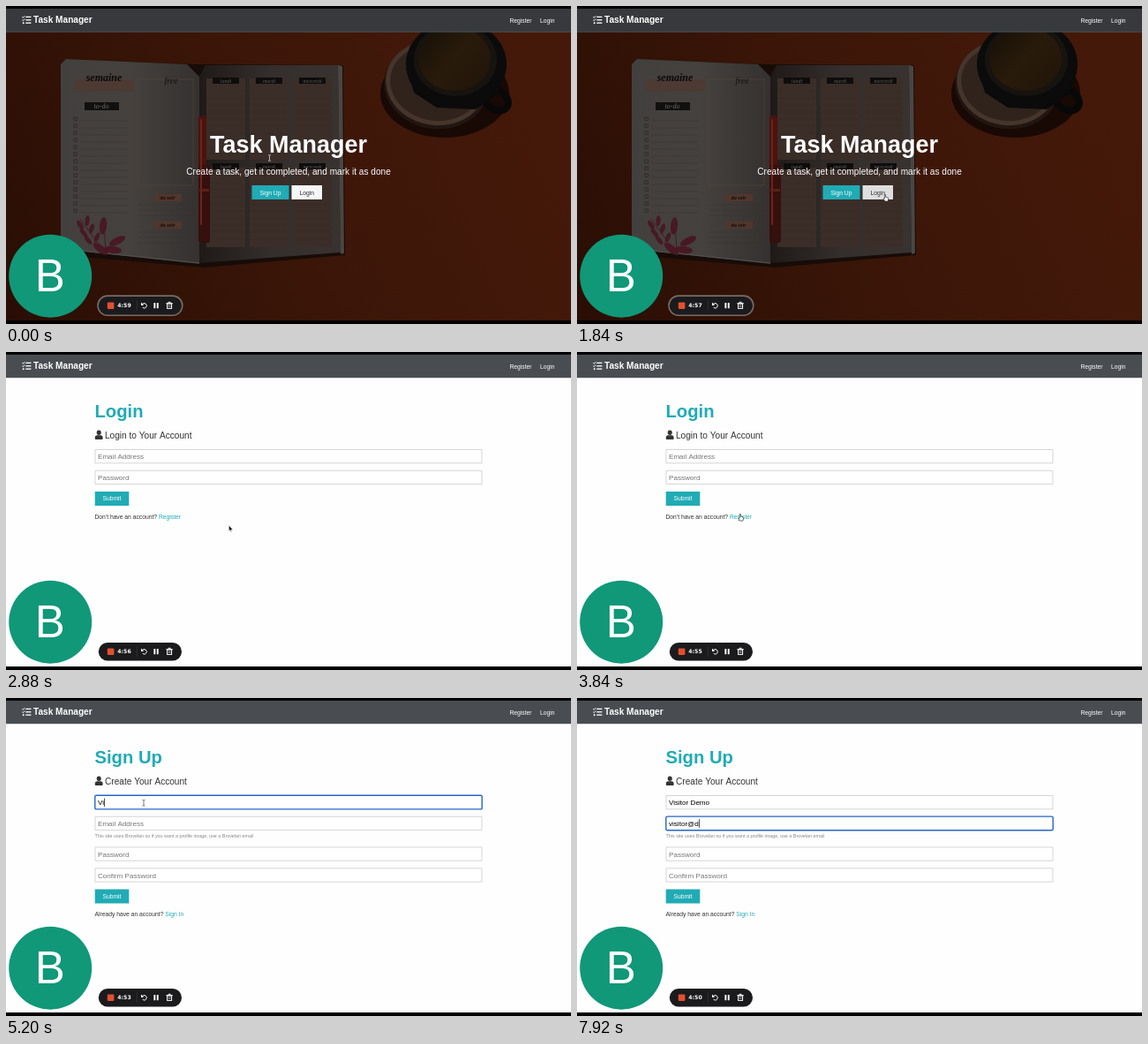
Animation of 640x360 px, one loop 8000 ms. Source, as an HTML page with a canvas:

```html
<!DOCTYPE html>
<html lang="en">
<head>
<meta charset="utf-8">
<title>Task Manager</title>
<style>
html, body { margin: 0; width: 100%; height: 100%; overflow: hidden; background: #000; }
canvas { display: block; width: 640px; height: 360px; }
</style>
</head>
<body>
<canvas id="stage" width="640" height="360"></canvas>
<script>
const c = document.getElementById('stage').getContext('2d');
const LOOP = 8000, STEP = 80;
const TEAL = '#20abb5', SANS = '"Liberation Sans", Arial, sans-serif';
const REM = 6.746;

// screen changes
const LOGIN_AT = 1920, SIGNUP_AT = 3920, NAME_FOCUS = 4480, EMAIL_FOCUS = 6560;
const TICKS = [560, 1440, 2480, 3360, 4240, 4960, 5760, 6560, 7360];

const NAME = 'Visitor Demo', EMAIL = 'visitor@d';
const NAME_KEYS = [4960, 5200, 5440, 5600, 5680, 5760, 5840, 5840, 6160, 6240, 6400, 6400];
const EMAIL_KEYS = [6960, 7040, 7120, 7280, 7360, 7440, 7600, 7760, 7920];

const count = (times, t) => times.filter(k => k <= t).length;

function rect(x, y, w, h, fill, r = 0) {
  c.beginPath();
  c.roundRect(x, y, w, h, r);
  c.fillStyle = fill;
  c.fill();
}

function oval(x, y, rx, ry, fill, turn = 0) {
  c.beginPath();
  c.ellipse(x, y, rx, ry, turn, 0, Math.PI * 2);
  c.fillStyle = fill;
  c.fill();
}

function poly(points, fill) {
  c.beginPath();
  points.forEach(([x, y]) => c.lineTo(x, y));
  c.closePath();
  c.fillStyle = fill;
  c.fill();
}

function line(x1, y1, x2, y2, color, width = 0.5) {
  c.beginPath();
  c.moveTo(x1, y1);
  c.lineTo(x2, y2);
  c.strokeStyle = color;
  c.lineWidth = width;
  c.stroke();
}

function text(s, x, y, size, color, weight = '', align = 'left', family = SANS) {
  c.font = `${weight} ${size}px ${family}`;
  c.fillStyle = color;
  c.textAlign = align;
  c.fillText(s, x, y);
  return c.measureText(s).width;
}

function fade(x1, y1, x2, y2, ...colors) {
  const g = c.createLinearGradient(x1, y1, x2, y2);
  colors.forEach((k, i) => g.addColorStop(i / (colors.length - 1), k));
  return g;
}

function notebook() {
  poly([[68, 60], [212, 66], [382, 67], [384, 282], [224, 296], [62, 282]], '#170c08');
  poly([[62, 66], [68, 60], [205, 66], [219, 80], [219, 292], [62, 275]],
    fade(62, 0, 219, 0, '#42403e', '#45413e', '#353130'));
  poly([[219, 80], [226, 67], [376, 67], [379, 279], [219, 291]],
    fade(219, 0, 380, 0, '#1f1a18', '#342e2c', '#383331'));
  poly([[376, 67], [381, 68], [383, 280], [379, 281]], '#4b4643');
  line(64, 275, 219, 291, '#57524e', 1);

  rect(78, 83, 67, 14, '#4c3a33');
  text('semaine', 111, 85, 12, '#0c0a0a', 'italic bold', 'center', '"Liberation Serif", serif');
  rect(89, 109, 39, 9, '#111010');
  text('to-do', 108, 116, 8, '#6c6865', 'italic', 'center', '"Liberation Serif", serif');
  for (let y = 126; y < 234; y += 8) {
    c.strokeStyle = '#23201f';
    c.lineWidth = 0.6;
    c.strokeRect(77, y, 3.5, 3.5);
    line(84, y + 4, 138, y + 4, '#38332f');
  }
  c.strokeStyle = '#5a4a38';
  c.strokeRect(149, 83, 63, 120);
  text('free', 187, 88, 10, '#14100e', 'italic', 'center', '"Liberation Serif", serif');
  for (const y of [213, 244]) {
    rect(168, y, 31, 8, '#51362c');
    text('du soir', 183, y + 6, 6, '#160d0a', 'italic bold', 'center', '"Liberation Serif", serif');
    for (let k = 12; k < 28; k += 6) line(150, y + k, 212, y + k, '#37322f');
  }

  for (let col = 0; col < 3; col++) {
    const x = 227 + col * 49, w = 44;
    rect(x, 82, w, 92, '#3b2d28');
    rect(x, 183, w, 90, '#3b2d28');
    for (let y = 96; y < 270; y += 8) if (y < 172 || y > 190) line(x + 2, y, x + w - 2, y, '#352824');
    for (const y of [81, 178]) {
      rect(x + 7, y, 30, 7, '#0f0d0c');
      text(['lundi', 'mardi', 'mercredi'][col], x + 22, y + 5.5, 6, '#5d5855', 'italic', 'center', '"Liberation Serif", serif');
    }
  }

  rect(218, 124, 9, 70, '#4b130e', 4);
  rect(218, 180, 13, 88, '#35100c', 3);
  rect(220, 128, 2, 120, '#6b241c', 1);
  rect(219, 207, 11, 3, '#5d2018');

  // pressed leaves
  const leaf = '#481924';
  [[84, 248, -0.6], [92, 243, 0.1], [88, 257, -0.7], [97, 252, 0.3], [93, 265, -0.7], [103, 262, 0.4]]
    .forEach(([x, y, a]) => oval(x, y, 2.5, 6, leaf, a));
  [[110, 249, 0.1], [126, 266, 1.1], [121, 276, 1.7], [107, 275, -0.9]]
    .forEach(([x, y, a]) => oval(x, y, 4, 10, leaf, a));
  line(84, 241, 114, 282, leaf, 1);
  line(111, 243, 113, 281, leaf, 1);
}

function coffee() {
  oval(497, 99, 73, 50, '#180905');
  oval(487, 90, 59, 49, '#211610', 0.15);
  oval(487, 87, 57, 48, '#45352b', 0.15);
  oval(487, 87, 52, 43, '#30231c', 0.15);
  c.beginPath();
  c.ellipse(555, 106, 15, 11, 0.6, 0, Math.PI * 2);
  c.strokeStyle = '#090808';
  c.lineWidth = 8;
  c.stroke();
  poly([[453, 64], [567, 64], [557, 100], [532, 117], [488, 115], [462, 98]], '#0b0a0a');
  oval(510, 66, 57, 50, '#0c0b0b');
  oval(509, 61, 47, 41, '#17130f');
  oval(508, 60, 41, 36, fade(470, 30, 540, 95, '#171008', '#291b0b', '#21150a'));
}

function home(t) {
  rect(0, 3, 640, 353, fade(0, 330, 600, 60, '#2a0e05', '#3b1608', '#45190a'));
  notebook();
  coffee();
  nav('#37393c');
  line(0, 29.3, 640, 29.3, '#52605f', 0.7);
  text('Task Manager', 320, 166, REM * 4, '#fff', 'bold', 'center');
  text('Create a task, get it completed, and mark it as done', 320, 191, REM * 1.5, '#fff', '', 'center');
  rect(278.5, 203, 42, 16, TEAL);
  text('Sign Up', 299.5, 213.5, REM, '#fff', '', 'center');
  rect(323.5, 203, 34.5, 16, t >= 1440 ? '#dedede' : '#f6f6f6');
  text('Login', 340.8, 213.5, REM, '#333', '', 'center');
}

function nav(fill) {
  rect(0, 3, 640, 26.3, fill);
  for (let i = 0; i < 3; i++) {
    const y = 12.4 + i * 3.4;
    line(22.3, y, 28.4, y, '#fff', 1.3);
    if (i < 2) {
      c.beginPath();
      c.moveTo(18.3, y);
      c.lineTo(19.4, y + 0.9);
      c.lineTo(21.2, y - 1.2);
      c.strokeStyle = '#fff';
      c.lineWidth = 1;
      c.stroke();
    } else oval(19.7, y, 1, 1, '#fff');
  }
  text('Task Manager', 31, 19.4, REM * 1.5, '#fff', 'bold');
  text('Register', 570.5, 18.6, REM, '#fff');
  text('Login', 605, 18.6, REM, '#fff');
}

function field(y, hint, value = '', focus = false) {
  c.beginPath();
  if (focus) {
    c.roundRect(100.8, y - 0.2, 438.4, 15.6, 1.5);
    c.strokeStyle = '#2467c8';
    c.lineWidth = 1.4;
  } else {
    c.rect(101, y, 438, 15.3);
    c.strokeStyle = '#c4c4c4';
    c.lineWidth = 0.7;
  }
  c.fillStyle = '#fff';
  c.fill();
  c.stroke();
  const w = text(value || hint, 104, y + 10.7, REM * 1.2, value ? '#000' : '#757575');
  if (focus) rect(104 + (value ? w + 0.2 : 0), y + 3, 0.7, 9.4, '#000');
}

function page(title, lead) {
  rect(0, 3, 640, 353, '#fefefe');
  nav('#494d51');
  text(title, 100.5, 73.8, REM * 3, TEAL, 'bold');
  oval(105.2, 91.2, 2.5, 2.7, '#333');
  rect(100.8, 94.2, 8.8, 4.8, '#333', [2.6, 2.6, 0.8, 0.8]);
  text(lead, 112, 97.5, REM * 1.5, '#333');
}

function submit(y, question, link) {
  rect(100.7, y, 38.6, 16, TEAL);
  text('Submit', 120, y + 10.4, REM, '#fff', '', 'center');
  const w = text(question + ' ', 100.5, y + 30.6, REM, '#333');
  text(link, 100.5 + w, y + 30.6, REM, TEAL);
}

function login() {
  page('Login', 'Login to Your Account');
  field(110.5, 'Email Address');
  field(134.3, 'Password');
  submit(158, "Don't have an account?", 'Register');
}

function signup(t) {
  page('Sign Up', 'Create Your Account');
  field(110.5, 'Name', NAME.slice(0, count(NAME_KEYS, t)), t >= NAME_FOCUS && t < EMAIL_FOCUS);
  field(134.3, 'Email Address', EMAIL.slice(0, count(EMAIL_KEYS, t)), t >= EMAIL_FOCUS);
  text('This site uses Brovelan so if you want a profile image, use a Brovelan email',
    100.5, 158, REM * 0.8, '#888');
  field(168.9, 'Password');
  field(192.8, 'Confirm Password');
  submit(216.6, 'Already have an account?', 'Sign In');
}

function recorder(t) {
  const dark = t < LOGIN_AT;
  oval(50.2, 305.7, 47, 47, '#109878');
  text('B', 49.8, 323, 51, '#fff', '', 'center');

  if (dark) rect(103.2, 327.3, 97.4, 23.6, '#776c63', 11.8);
  rect(104.8, 329, 94.2, 20.4, '#1b1b1e', 10.2);
  rect(114.8, 335.4, 7.6, 7.6, '#e2502f', 1.2);
  const sec = 59 - count(TICKS, t);
  text('4:' + sec, 134, 341.2, 6.2, '#fff', 'bold', 'center', '"DejaVu Sans", sans-serif');
  line(148.3, 333, 148.3, 345, '#3f3f43', 0.6);

  c.strokeStyle = '#fff';
  c.lineWidth = 1;
  c.beginPath();
  c.arc(156.6, 339.3, 2.7, -2.6, 2.4);
  c.stroke();
  poly([[153, 335.6], [153, 339], [156.2, 338.6]], '#fff');
  rect(167.4, 336, 1.9, 6.2, '#fff', 0.5);
  rect(170.8, 336, 1.9, 6.2, '#fff', 0.5);
  line(181.4, 336.7, 188.8, 336.7, '#fff', 1);
  line(183.6, 335.3, 186.6, 335.3, '#fff', 1);
  c.strokeRect(182.6, 337, 5, 5.4);
  line(184.3, 338.4, 184.3, 341, '#fff', 0.6);
  line(186, 338.4, 186, 341, '#fff', 0.6);
}

const shapes = {
  hand: new Path2D('M-1.6-4Q-.9-4.6-.4-4V-1.2L2-.7Q2.8-.4 2.7.4L2.2 3.6H-1.2L-3 .6Q-2.9-.2-1.6.6Z'),
  arrow: new Path2D('M-2-4V3L-.4 1.6 .7 4 1.7 3.5 .7 1.2H3Z'),
  beam: new Path2D('M-1.5-3.4Q0-3.4 0-2.7Q0-3.4 1.5-3.4M0-2.7V2.7M-1.5 3.4Q0 3.4 0 2.7Q0 3.4 1.5 3.4')
};

function pointer(kind, x, y, light) {
  c.save();
  c.translate(x, y);
  c.lineJoin = 'round';
  if (kind === 'beam') {
    c.strokeStyle = light ? '#d8d8d8' : '#555';
    c.lineWidth = 0.8;
  } else {
    c.fillStyle = kind === 'hand' ? '#fff' : '#111';
    c.strokeStyle = kind === 'hand' ? '#333' : '#fff';
    c.lineWidth = 0.7;
    c.fill(shapes[kind]);
  }
  c.stroke(shapes[kind]);
  c.restore();
}

// start, end, from, to, shapes at start / on the way / at the end
const MOVES = [
  [160, 1440, [298.5, 172], [350, 217.5], 'beam', 'arrow', 'hand'],
  [2080, 3520, [350, 217.5], [185.8, 187.5], 'hand', 'arrow', 'hand'],
  [4000, 4480, [185.8, 187.5], [156, 118.8], 'hand', 'arrow', 'beam']
];

function mouse(t) {
  if (t >= 6000) return;
  const m = MOVES.filter(k => k[0] <= t).pop() || MOVES[0];
  const [start, end, from, to, first, mid, last] = m;
  const p = Math.min(1, Math.max(0, (t - start) / (end - start)));
  const e = p * p * (3 - 2 * p);
  const kind = e < 0.05 ? first : e > 0.88 ? last : mid;
  pointer(kind, from[0] + (to[0] - from[0]) * e, from[1] + (to[1] - from[1]) * e, t < LOGIN_AT);
}

function draw(now) {
  const t = Math.floor((now % LOOP) / STEP) * STEP;
  rect(0, 0, 640, 360, '#000');
  if (t < LOGIN_AT) home(t);
  else if (t < SIGNUP_AT) login();
  else signup(t);
  recorder(t);
  mouse(t);
}

let origin;
function frame(now) {
  origin ??= now;
  draw(now - origin);
  requestAnimationFrame(frame);
}
draw(0);
requestAnimationFrame(frame);
</script>
</body>
</html>
```
